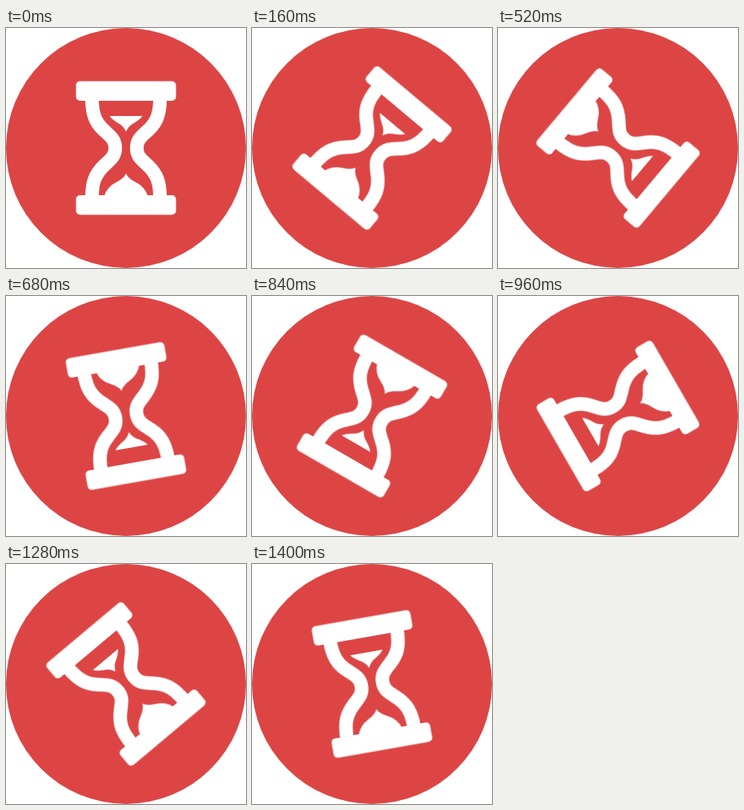
Recreate the animation shown at these times as an HTML page. Size 300 by 300 pixels, loop 1440 ms.

```html
<!DOCTYPE html>
<html lang="en">
<head>
<meta charset="utf-8">
<title>Turning hourglass</title>
<style>
  html, body { margin: 0; width: 100%; height: 100%; overflow: hidden; background: #fff; }
  svg { display: block; width: 100vw; height: 100vh; }
  .disc { fill: #dd4545; }
  .glass { fill: #fff; transform-origin: 150px 150px; }
  .wall { fill: none; stroke: #fff; stroke-width: 17; }
</style>
</head>
<body>
<svg viewBox="0 0 300 300">
  <circle class="disc" cx="150" cy="150" r="150"/>
  <g class="glass">
    <rect x="87.5" y="66.5" width="125" height="24.5" rx="5"/>
    <rect x="87.5" y="209" width="125" height="24.5" rx="5"/>
    <path class="wall" d="M107.5 88C107.5 108 112 118 121.5 127S136.5 139 136.5 150S131 163.500 121.5 173S107.500 192 107.500 212"/>
    <path class="wall" d="M192.500 88C192.500 108 188 118 178.500 127S163.500 139 163.500 150S169 163.500 178.500 173S192.500 192 192.500 212"/>
    <path d="M129.500 110H170.500Q167 115 158 120Q153 123 150 129.500Q147 123 142 120Q133 115 129.500 110Z"/>
    <path d="M150 182Q153 188 160 191.500Q175 199 177.500 211H122.500Q125 199 140 191.500Q147 188 150 182Z"/>
  </g>
</svg>
<script>
  // One full turn, ten degrees at a time
  const LOOP = 1440, STEPS = 36;
  document.querySelector('.glass').animate(
    [{ transform: 'rotate(0deg)' }, { transform: 'rotate(360deg)' }],
    { duration: LOOP, iterations: Infinity, easing: `steps(${STEPS})` }
  );
</script>
</body>
</html>
```
